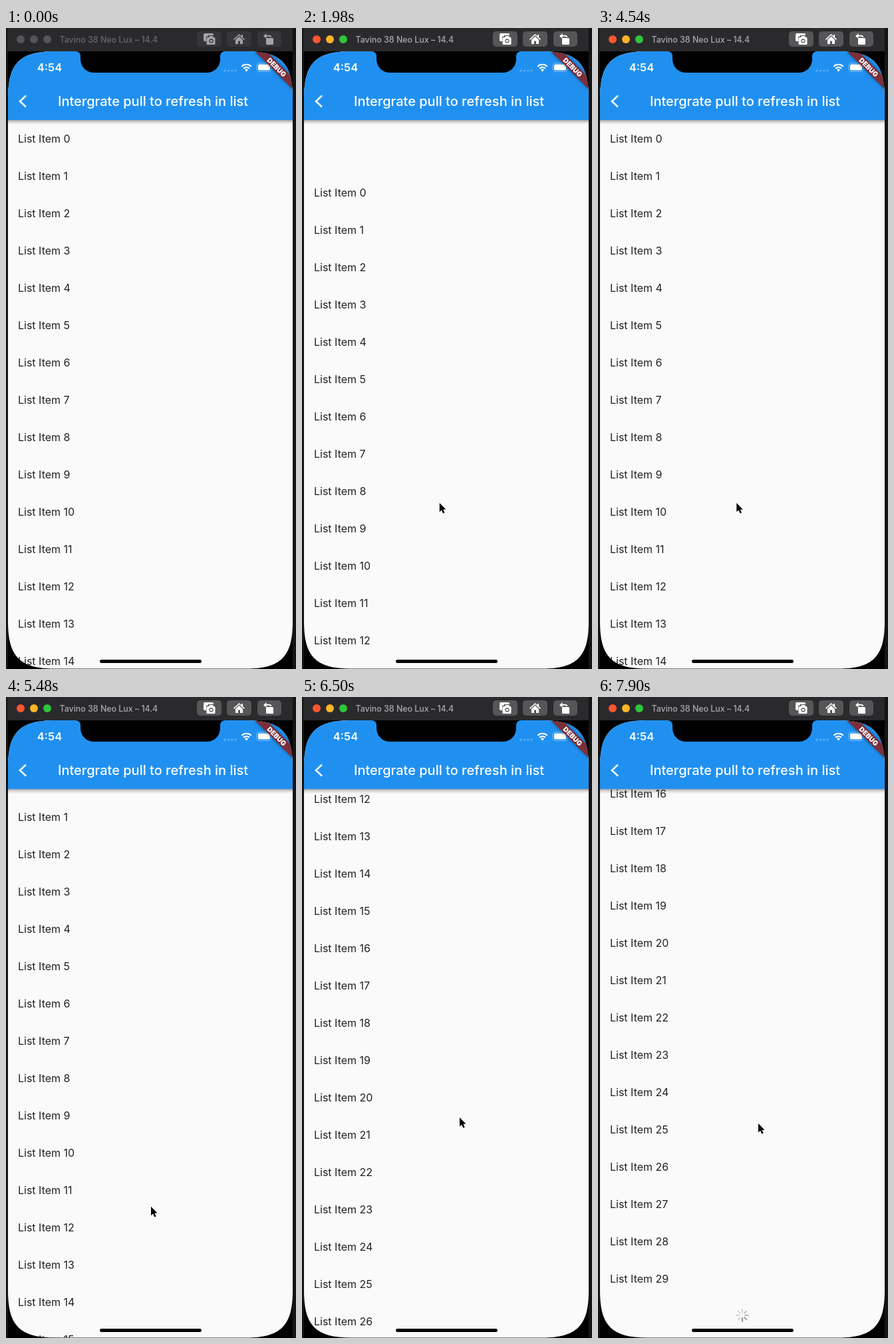
Write an HTML page that moves like this. It is 436 px wide and 962 px high and loops after 8 s.

```html
<!DOCTYPE html>
<html lang="en">
<head>
<meta charset="utf-8">
<title>Pull to refresh</title>
<style>
  html, body { margin: 0; width: 100%; height: 100%; overflow: hidden; background: #151515; }
  svg { display: block; width: 100vw; height: 100vh; font-family: Inter, Roboto, sans-serif; }
</style>
</head>
<body>
<svg viewBox="0 0 436 962">
  <defs>
    <clipPath id="screen">
      <path d="M3 105C3 53 21 35 73 35H361C413 35 431 53 431 105V891.500C431 943.500 413 961.500 361 961.500H73C21 961.500 3 943.500 3 891.500Z"/>
    </clipPath>
    <linearGradient id="shade" x2="0" y2="1">
      <stop offset="0" stop-opacity=".36"/>
      <stop offset=".45" stop-opacity=".14"/>
      <stop offset="1" stop-opacity="0"/>
    </linearGradient>
    <filter id="blur" x="-20%" y="-60%" width="140%" height="220%"><feGaussianBlur stdDeviation="2.5"/></filter>
  </defs>

  <rect width="436" height="962" fill="#151515"/>
  <rect x="2" width="429" height="36" fill="#2a2a2c"/>
  <g id="lights"></g>
  <text id="device" x="80.500" y="21.500" font-size="12.4" font-weight="500">Tavino 38 Neo Lux – 14.4</text>
  <g id="buttons">
    <rect x="287" y="5" width="37" height="23" rx="5"/>
    <rect x="332" y="5" width="37" height="23" rx="5"/>
    <rect x="378" y="5" width="36" height="23" rx="5"/>
  </g>
  <g id="icons">
    <path d="M299 8h11a2 2 0 0 1 2 2v1h-8l-1 2h-2v7h-2a2 2 0 0 1-2-2v-8a2 2 0 0 1 2-2z"/>
    <path fill-rule="evenodd" d="M303 14h2l1-2h5l1 2h1a1.500 1.500 0 0 1 1.500 1.500v8a1.500 1.500 0 0 1-1.500 1.500h-10a1.500 1.500 0 0 1-1.500-1.500v-8a1.500 1.500 0 0 1 1.500-1.500zM308.500 16a3.300 3.300 0 1 0 .01 0z"/>
    <circle cx="308.500" cy="19.300" r="1.900"/>
    <path d="M350.500 9l3.500 3.200V10h2v4l3 2.800-1 1.200-7.500-7-7.500 7-1-1.200z"/>
    <path d="M350.500 12.700l5.500 5V24h-4v-4.500h-3V24h-4v-6.300z"/>
    <rect x="391" y="15" width="11" height="10" rx="1.500"/>
    <path d="M387 12l4.500-4v2.800h4a4 4 0 0 1 4 3h-2a3 3 0 0 0-2-1h-4V16z"/>
  </g>

  <rect x="3" y="35" width="428" height="927"/>
  <g clip-path="url(#screen)">
    <rect x="3" y="35" width="428" height="927" fill="#fafafa"/>
    <g id="list" font-size="16" fill="#222"></g>
    <g id="header"></g>
    <rect x="3" y="138" width="428" height="7" fill="url(#shade)"/>
    <rect x="3" y="35" width="428" height="103" fill="#2090f0"/>
    <path d="M104 35q8 0 8 8v4a20 20 0 0 0 20 20h170a20 20 0 0 0 20-20v-4q0-8 8-8z"/>
    <g fill="#fff">
      <text x="65.500" y="65" font-size="16.500" font-weight="600" text-anchor="middle">4:54</text>
      <text x="221" y="117" font-size="20" font-weight="500" text-anchor="middle">Intergrate pull to refresh in list</text>
      <g id="signal" opacity=".3"></g>
      <path d="M361.500 65.500l-2.600-2.700a3.800 3.800 0 0 1 5.200 0z"/>
      <rect x="379" y="54.500" width="18" height="9" rx="2"/>
    </g>
    <g fill="none" stroke="#fff">
      <path d="M30 101.500l-9 8.500 9 8.500" stroke-width="2.500"/>
      <path d="M357 60.800a6.600 6.600 0 0 1 9 0M354.300 57.700a10.500 10.500 0 0 1 14.400 0" stroke-width="2"/>
      <rect x="377" y="52.500" width="22" height="13" rx="4" opacity=".4"/>
    </g>
    <g transform="translate(431 35) rotate(45)">
      <rect x="-40" y="28" width="80" height="12" opacity=".5" filter="url(#blur)"/>
      <rect x="-40" y="28" width="80" height="12" fill="#7c2e38"/>
      <text y="37.700" font-size="10.2" font-weight="900" fill="#fff" text-anchor="middle">DEBUG</text>
    </g>
    <rect x="141" y="948" width="153" height="5" rx="2.500"/>
  </g>
  <path id="cursor" d="M0 0V13.500L3.100 10.700 5.300 15.700 7.700 14.700 5.500 9.800H9.500Z" stroke="#fff" stroke-width="1.200" paint-order="stroke"/>
</svg>
<script>
const LOOP = 8000, ROW = 56, ROWS = 30, FOCUS_AT = 700;
const REFRESH_AT = 2700, LOAD_AT = 7170, WAIT = 1000;
const $ = id => document.getElementById(id);

function add(parent, tag, attrs, text = '') {
  const el = document.createElementNS('http://www.w3.org/2000/svg', tag);
  for (const k in attrs) el.setAttribute(k, attrs[k]);
  el.textContent = text;
  return parent.appendChild(el);
}

const linear = p => p;
const smooth = p => p * p * (3 - 2 * p);
const easeIn = p => p ** 1.5;
const easeOut = p => 1 - (1 - p) ** 3;
// Momentum after a swipe: velocity decays exponentially.
const coast = p => (1 - Math.exp(-2.56 * p)) / (1 - Math.exp(-2.56));

// Keys are [time, value, easing towards this key].
function track(keys, t) {
  const i = keys.findIndex(k => k[0] > t);
  if (i < 0) return keys[keys.length - 1][1];
  if (i === 0) return keys[0][1];
  const [t0, a] = keys[i - 1], [t1, b, ease = smooth] = keys[i];
  return a + (b - a) * ease((t - t0) / (t1 - t0));
}

// Pull, refresh, close; swipe and coast; swipe past the end, spring back.
const scroll = [
  [1000, 0], [1160, 20, easeIn], [2200, 82, easeOut], [2600, 82], [2850, 60, easeOut],
  [4300, 60], [4600, 0, easeOut],
  [5410, 0], [5480, -41, easeIn], [5640, -250, linear], [6920, -739, coast],
  [7150, -902, easeIn], [7200, -969, linear], [7270, -985, easeOut], [7720, -917, easeOut]
];
const cursorX = [
  [300, 440], [850, 205, easeOut], [1160, 205], [2200, 207], [4300, 207], [5300, 216],
  [5480, 218], [5640, 230], [6500, 237], [7200, 234], [7800, 241]
];
const cursorY = [
  [300, 470], [850, 549, easeOut], [1000, 549], [1160, 588, easeIn], [2200, 714, easeOut],
  [2600, 714], [3000, 689], [4300, 689], [5200, 824], [5380, 824],
  [5480, 766, easeIn], [5640, 557, linear], [6500, 631], [6800, 736], [6920, 736],
  [7200, 460, easeIn], [7270, 430, easeOut], [7800, 640]
];

function makeSpinner(parent) {
  const g = add(parent, 'g', { fill: '#3c3c44' });
  const ticks = Array.from({ length: 8 }, (_, i) => add(g, 'rect', {
    x: -1, y: -10, width: 2, height: 6.7, rx: 1, transform: `rotate(${i * 45})`
  }));
  return (y, visible, time) => {
    g.setAttribute('transform', `translate(217 ${y})`);
    g.setAttribute('visibility', visible ? 'visible' : 'hidden');
    const active = Math.floor(time / 125);
    ticks.forEach((tick, i) => {
      const age = (((i - active) % 8) + 8) % 8;
      tick.setAttribute('opacity', (47 + 25 * Math.max(0, age - 3)) / 255);
    });
  };
}

for (let i = 0; i < ROWS; i++) {
  add($('list'), 'text', { x: 18, y: 172 + i * ROW }, `List Item ${i}`);
}
for (let i = 0; i < 4; i++) add($('signal'), 'circle', { cx: 329 + i * 5.4, cy: 64, r: 1.6 });
const lights = ['#ff5430', '#ffb52a', '#2fc43c'].map((color, i) => ({
  color, el: add($('lights'), 'circle', { cx: 22 + i * 20, cy: 17, r: 6 })
}));
const refreshing = makeSpinner($('header'));
const loading = makeSpinner($('list'));

function draw(t) {
  const focused = t >= FOCUS_AT;
  lights.forEach(({ el, color }) => el.setAttribute('fill', focused ? color : '#555558'));
  $('device').setAttribute('fill', focused ? '#aaaaac' : '#68686a');
  $('buttons').setAttribute('fill', focused ? '#565658' : '#363638');
  $('icons').setAttribute('fill', focused ? '#fff' : '#a4a4a6');

  $('list').setAttribute('transform', `translate(0 ${track(scroll, t)})`);
  refreshing(168, t >= REFRESH_AT && t < REFRESH_AT + WAIT, t - REFRESH_AT);
  loading(1845, t >= LOAD_AT, t - LOAD_AT);

  $('cursor').setAttribute('transform', `translate(${track(cursorX, t)} ${track(cursorY, t)})`);
}

const start = performance.now();
function frame() {
  draw((performance.now() - start) % LOOP);
  requestAnimationFrame(frame);
}
draw(0);
requestAnimationFrame(frame);
</script>
</body>
</html>
```
